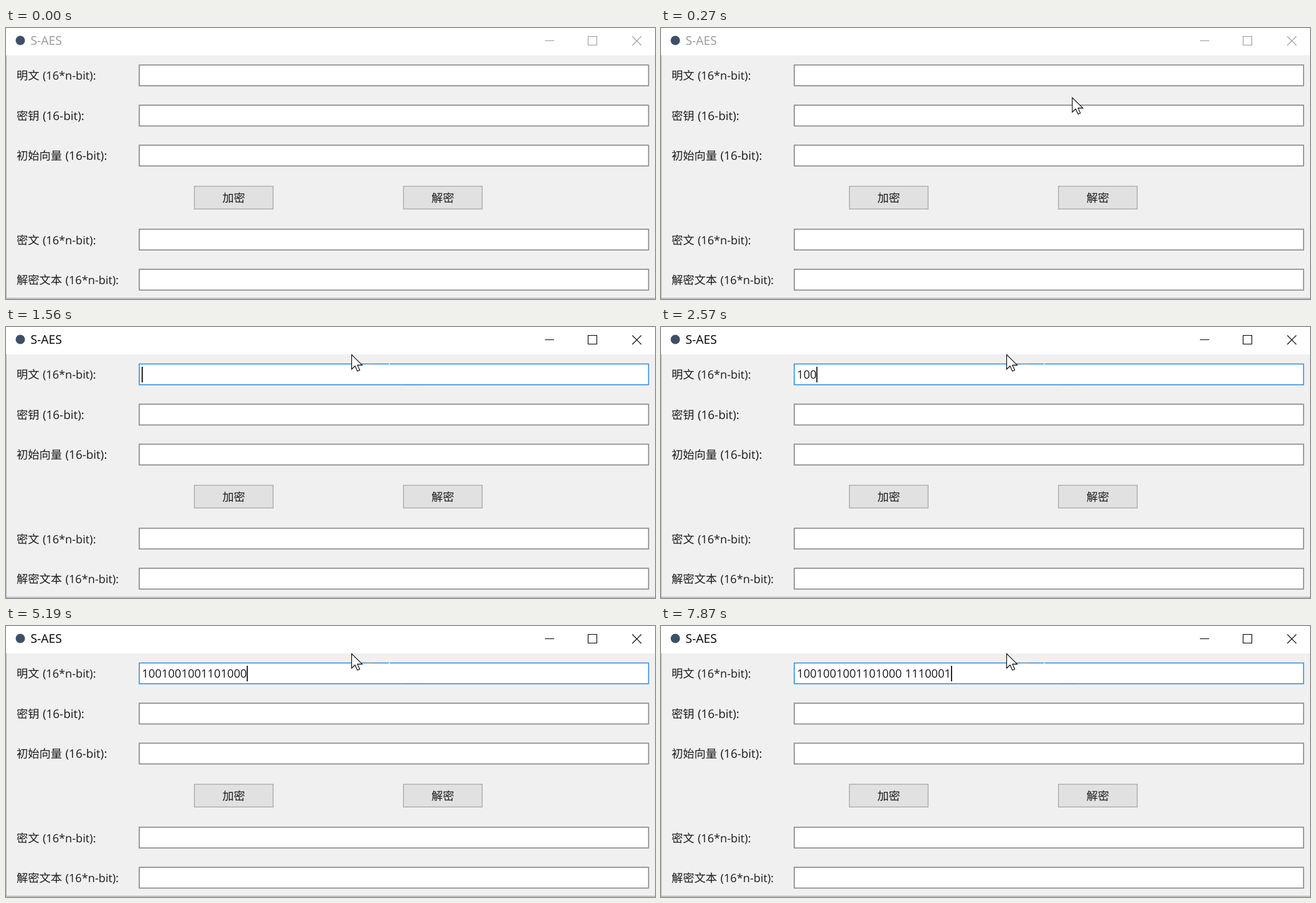
These frames come from a looping animation (1043 by 436 pixels, 8000 ms). An HTML page:

```html
<!DOCTYPE html>
<html lang="zh">
<head>
<meta charset="utf-8">
<title>S-AES</title>
<style>
  html, body { margin: 0; width: 100%; height: 100%; overflow: hidden; background: #f0f0f0; }
  svg { display: block; width: 1043px; height: 436px; }
  text { font-family: "Open Sans", "Noto Sans CJK SC", "Noto Sans CJK", sans-serif; font-size: 18.3px; fill: #1a1a1a; text-rendering: geometricPrecision; white-space: pre; }
  .cjk { font-family: "Noto Sans CJK SC", "Noto Sans CJK", sans-serif; }
</style>
</head>
<body>
<svg id="stage" viewBox="0 0 1043 436"></svg>
<script>
const LOOP = 8000;
const FOCUS = 620;
const MESSAGE = '1001001001101000 1110001';
const DIGIT = 10.553, SPACE = 5.3;

// Moment at which each character of the message appears
const KEYS = [2230, 2360, 2570, 2770, 3040, 3170, 3310, 3510, 3710, 3860, 3990, 4190,
  4330, 4530, 4730, 4860, 6000, 6540, 6730, 6870, 7000, 7200, 7470, 7800];
// Caret toggles, starting with "on"
const BLINKS = [620, 1230, 1560, 2160, 2430, 3110, 3380, 3990, 4260, 4860, 5190, 5790,
  6060, 6670, 7000, 7600, 7870];
// Pointer: time, shape, x, y
const POINTER = [
  [0, 'none', 0, 0],
  [70, 'arrow', 712, 372],
  [130, 'arrow', 688, 262],
  [200, 'arrow', 668, 165],
  [270, 'arrow', 661, 112],
  [340, 'arrow', 660, 97],
  [410, 'beam', 658, 88],
  [480, 'beam', 657, 85],
  [550, 'beam', 657, 84],
  [620, 'click', 657, 84],
  [750, 'beam', 650, 78],
  [820, 'arrow', 605, 51],
  [890, 'arrow', 575, 46],
  [960, 'arrow', 555.5, 44.5]
];

const stage = document.getElementById('stage');

function add(tag, attrs, content, parent = stage) {
  const node = document.createElementNS('http://www.w3.org/2000/svg', tag);
  for (const key in attrs) node.setAttribute(key, attrs[key]);
  if (content) node.textContent = content;
  parent.appendChild(node);
  return node;
}

const box = (x, y, width, height, fill, stroke = 'none', w = 1) =>
  add('rect', { x, y, width, height, fill, stroke, 'stroke-width': w });

function field(y) {
  return box(214.2, y + 0.2, 818.4, 33.4, '#fff', '#7f7f7f', 1.5);
}

function row(y, name, format, size) {
  add('text', { x: 17, y: y + 24, class: 'cjk' }, name);
  add('text', { x: 22.3 + name.length * 18.3, y: y + 24, style: `font-size:${size}px` }, format);
  return field(y);
}

function button(x, name) {
  box(x, 254.6, 126.6, 36.6, '#e1e1e1', '#adadad', 1.4);
  add('text', { x: x + 63.3, y: 279.5, class: 'cjk', 'text-anchor': 'middle' }, name);
}

// Window frame
box(0, 0, 1043, 436, '#f0f0f0');
box(0, 0, 1043, 44, '#fff');
box(0, 44, 1, 392, '#b4b4b4');
box(0, 434, 1043, 1.6, '#b4b4b4');
add('circle', { cx: 23, cy: 20, r: 7.5, fill: '#3d5068' });
const title = add('text', { x: 39.5, y: 27, style: 'font-size:19.3px' }, 'S-AES');
const controls = add('path', {
  d: 'M866 20.5h15M935.5 13.5h14v14h-14zM1006.5 13.5l14.5 14.5M1021 13.5l-14.5 14.5',
  fill: 'none', 'stroke-width': 1.1
});

// Form
const input = row(59.3, '明文', '(16*n-bit):', 18.2);
row(124, '密钥', '(16-bit):', 18.9);
row(188.3, '初始向量', '(16-bit):', 18.9);
button(302.7, '加密');
button(638.7, '解密');
row(323.5, '密文', '(16*n-bit):', 18.2);
row(388, '解密文本', '(16*n-bit):', 18.2);

// Faint trail left on the input border by the pointer
const trail = add('g', { 'stroke-width': 1 });
add('path', { d: 'M579 59.5h13', stroke: '#8a8078' }, '', trail);
add('path', { d: 'M615 59.5h2', stroke: '#d5e9f8' }, '', trail);
add('path', { d: 'M640 92.9h30', stroke: '#4c9de0' }, '', trail);

const typed = add('text', { x: 218.4, y: 83, style: 'font-size:18.45px;word-spacing:.5px' });
const caret = box(218, 64, 1.7, 25, '#000');

// Pointer shapes
const pointer = add('g', {});
const halo = add('circle', { cx: -2, cy: -2, r: 18, fill: '#ffff00', opacity: 0.52 }, '', pointer);
const beam = add('path', {
  d: 'M-6.5 -12h5l1.5 1.5l1.5 -1.5h5M0 -10.5v21M-6.5 12h5l1.5 -1.5l1.5 1.5h5',
  fill: 'none', stroke: '#2c2c10', 'stroke-width': 1.6
}, '', pointer);
const arrow = add('path', {
  d: 'M0 0V23.5L5.4 18.3L9.2 26.6L13 24.9L9.3 16.9H17Z',
  fill: '#fff', stroke: '#000', 'stroke-width': 1.1
}, '', pointer);

const show = (node, on) => node.setAttribute('visibility', on ? 'visible' : 'hidden');
const passed = (times, t) => times.filter(time => time <= t).length;

function render(t) {
  const focused = t >= FOCUS;
  const ink = focused ? '#000' : '#999';
  title.style.fill = ink;
  controls.setAttribute('stroke', ink);
  input.setAttribute('stroke', focused ? '#2a8bdc' : '#7f7f7f');
  show(trail, t >= 820);

  const text = MESSAGE.slice(0, passed(KEYS, t));
  if (typed.textContent !== text) typed.textContent = text;
  const width = [...text].reduce((sum, c) => sum + (c === ' ' ? SPACE : DIGIT), 0);
  caret.setAttribute('x', 218 + width);
  show(caret, passed(BLINKS, t) % 2 === 1);

  const [, shape, x, y] = POINTER[passed(POINTER.map(p => p[0]), t) - 1];
  pointer.setAttribute('transform', `translate(${x} ${y})`);
  show(arrow, shape === 'arrow');
  show(beam, shape === 'beam' || shape === 'click');
  show(halo, shape === 'click');
}

const start = performance.now();
function tick() {
  render((performance.now() - start) % LOOP);
  requestAnimationFrame(tick);
}
tick();
</script>
</body>
</html>
```
